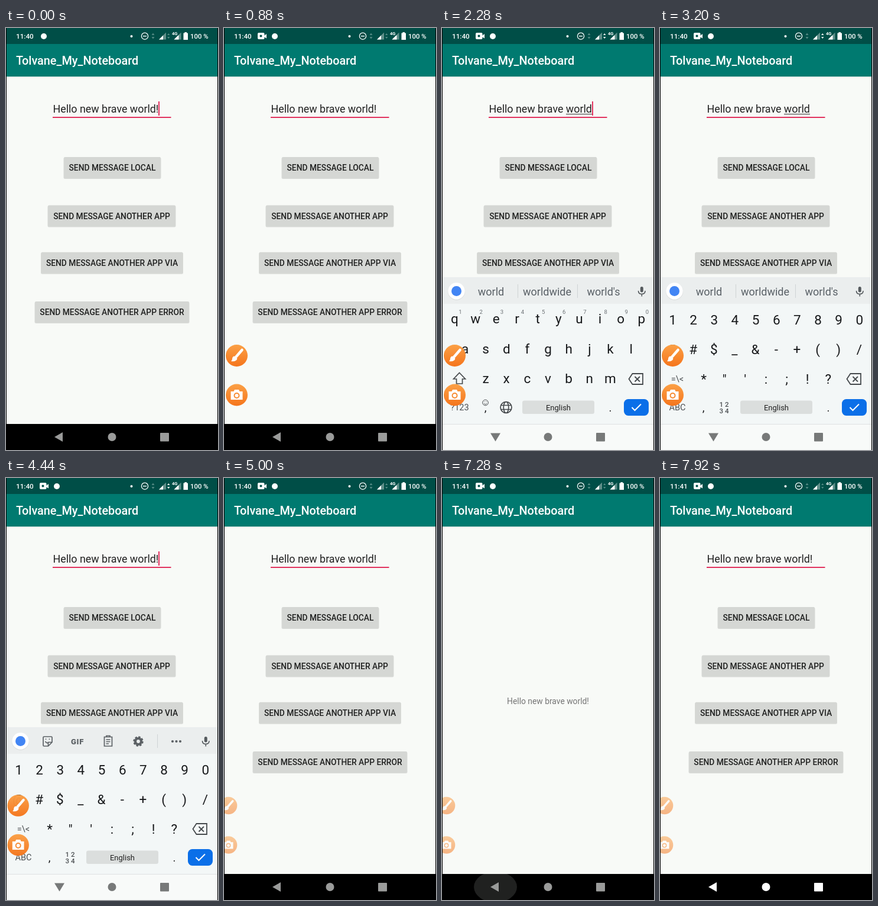
Write an HTML page that moves like this. It is 359x713 px and loops after 8 s.

```html
<!DOCTYPE html>
<html lang="en">
<head>
<meta charset="utf-8">
<title>Messaging demo</title>
<style>
html, body { margin: 0; width: 100%; height: 100%; overflow: hidden; background: #000; }
svg { display: block; width: 100%; height: 100%; font-family: Roboto, sans-serif; }
</style>
</head>
<body>
<svg id="stage" viewBox="0 0 359 713">
  <defs>
    <linearGradient id="orange" x1="0" y1="0" x2="0" y2="1">
      <stop offset="0" stop-color="#fba046"/><stop offset="1" stop-color="#f5751c"/>
    </linearGradient>
    <clipPath id="screen"><rect x="1" y="0" width="357" height="669"/></clipPath>
    <clipPath id="navClip"><rect x="1" y="669" width="357" height="44"/></clipPath>
  </defs>
  <rect width="359" height="713"/>
  <rect x="1" y="82" width="357" height="587" fill="#f8faf7"/>
  <g id="main">
    <text id="entry" x="79.5" y="143" font-size="17.85" fill="#212121"></text>
    <path id="spell" d="M210 145.5H254" stroke="#333"/>
    <rect x="79" y="150" width="200.5" height="2" fill="#e2335f"/>
    <rect id="caret" x="258" y="124" width="2" height="24" fill="#e2335f"/>
    <path id="handle" d="M259 150.5L266 156.5A9.6 9.6 0 1 1 252 156.5Z" fill="#e2335f"/>
    <g id="buttons" font-size="13.82" font-weight="500" text-anchor="middle"></g>
  </g>
  <rect id="dim" x="1" y="82" width="357" height="587" opacity=".042"/>
  <g id="detail">
    <rect x="1" y="82" width="357" height="587" fill="#f8faf7"/>
    <text x="179.5" y="381.5" font-size="13.85" fill="#757575" text-anchor="middle">Hello new brave world!</text>
  </g>
  <rect x="1" y="82" width="357" height="2" fill="#000" opacity=".06"/>
  <rect x="1" y="27" width="357" height="55" fill="#007a70"/>
  <text x="17" y="62" font-size="19.85" font-weight="500" fill="#fff">Tolvane_My_Noteboard</text>
  <g id="status" fill="#fff" font-weight="500">
    <rect x="1" width="357" height="27" fill="#004e47"/>
    <text id="clock" x="17" y="18" font-size="11.7"></text>
    <g id="rec">
      <rect x="57" y="8" width="11.5" height="11" rx="2"/>
      <path d="M68 13L72 10V17.5L68 15Z"/>
      <circle cx="62.5" cy="13.5" r="2" fill="#004e47"/>
    </g>
    <circle id="badge" cy="14" r="5"/>
    <circle cx="212.5" cy="14" r="2"/>
    <circle cx="235" cy="13.7" r="5.6" fill="none" stroke="#fff" stroke-width="1.3"/>
    <path d="M232 13.7H238" stroke="#fff" stroke-width="1.4"/>
    <path d="M246.5 12L249 8.5L251.5 12ZM246.5 15L249 18.5L251.5 15Z" fill="#528a84"/>
    <path id="data" d="M273 12L275.2 9L277.5 12ZM273 15L275.2 18L277.5 15Z"/>
    <path d="M259 19.5L271 7.5V19.5ZM284.500 19.500L296.500 7.500V19.500Z" fill="#618f8a"/>
    <path d="M259 19.5L266 12.5V19.5ZM284.5 19.5L292.5 11.5V19.500Z"/>
    <rect x="280" y="5" width="11.5" height="8" fill="#004e47"/>
    <text x="281" y="12" font-size="7.5" font-weight="700">4G</text>
    <path d="M302.500 8.500V7H306V8.500H308V20H300.500V8.500Z"/>
    <text x="312" y="18" font-size="11.4">100 %</text>
  </g>
  <g clip-path="url(#screen)">
    <g id="keyboard">
      <rect x="1" y="421" width="357" height="248" fill="#f3f7f7"/>
      <rect x="1" y="421" width="357" height="45" fill="#ebeeee"/>
      <circle cx="24.500" cy="445.300" r="14.600" fill="#000" opacity=".07"/>
      <circle cx="24.500" cy="444.500" r="14.200" fill="#fff"/>
      <circle cx="24.500" cy="444.500" r="8.500" fill="#4285f4"/>
      <g id="tools" fill="none" stroke="#5c6165" stroke-width="1.7">
        <path d="M64.500 437H76.500Q78 437 78 438.500V446.500L71.500 453H64.500Q63 453 63 451.500V438.500Q63 437 64.500 437ZM78 446.500H71.500V453M66.500 445Q69 449 72 447M67.500 440.500V442M73.500 440.500V442"/>
        <text x="121" y="449.500" font-size="13" font-weight="900" text-anchor="middle" fill="#5c6165" stroke="none" letter-spacing=".7">GIF</text>
        <path d="M166.500 437.500H179.500V453H166.500ZM170 437.500V435.500H176V437.500M169.500 442H176.500M169.500 445.500H176.500M169.500 449H174"/>
        <circle cx="224" cy="445" r="5" stroke-width="4.200"/>
        <circle cx="224" cy="445" r="7.500" stroke-width="2.400" stroke-dasharray="3.500 2.390"/>
        <path d="M256.500 433V456" stroke="#cfd3d4" stroke-width="1"/>
        <path d="M282 445h.01M288.500 445h.01M295 445h.01" stroke-width="4.200" stroke-linecap="round"/>
      </g>
      <g id="words" font-size="18" fill="#596066" text-anchor="middle">
        <text x="83" y="451.500">world</text>
        <text x="178" y="451.500">worldwide</text>
        <text x="273.500" y="451.500">world's</text>
        <path d="M128.500 433V456M229.500 433V456" stroke="#cfd3d4"/>
      </g>
      <g fill="none" stroke="#555a5e" stroke-width="1.600">
        <rect x="335.800" y="437" width="5" height="9.500" rx="2.500" fill="#555a5e" stroke="none"/>
        <path d="M332.500 444Q332.500 449.500 338.300 449.500T344 444M338.300 449.500V453.500"/>
      </g>
      <g id="letters" text-anchor="middle" fill="#17191b"></g>
      <g id="symbols" text-anchor="middle" fill="#17191b"></g>
      <path d="M322.500 584H340V602H322.500L316.500 593ZM326.500 589L335 597.500M335 589L326.500 597.500" fill="none" stroke="#45494c" stroke-width="1.800"/>
      <rect x="136" y="629.500" width="122" height="22.500" rx="3.500" fill="#dbdedd"/>
      <text x="197" y="646" font-size="13" text-anchor="middle" fill="#222">English</text>
      <text x="285" y="648" font-size="19" text-anchor="middle" fill="#222">.</text>
      <rect x="308" y="627" width="42" height="28" rx="7.500" fill="#0b6fe8"/>
      <path d="M321.500 641L326.500 646L337 635.500" fill="none" stroke="#fff" stroke-width="2"/>
    </g>
    <g id="brush">
      <circle r="18.500" fill="url(#orange)"/>
      <path d="M9 -9.500L-1 2" stroke="#fff" stroke-width="4.500" stroke-linecap="round"/>
      <path d="M-3.500 1L1 5Q-1 11 -9.500 9.500Q-7.500 8 -7.500 5Q-7 1 -3.500 1Z" fill="#fff"/>
    </g>
    <g id="camera">
      <circle r="18.500" fill="url(#orange)"/>
      <path d="M-10 -6H-5L-3.500 -9H3.500L5 -6H10V8H-10Z" fill="#fff"/>
      <circle cy="1" r="4" fill="none" stroke="#f78a30" stroke-width="2"/>
    </g>
  </g>
  <g clip-path="url(#navClip)">
    <rect id="navLight" x="1" y="669" width="357" height="44" fill="#f8faf9"/>
    <path id="navLine" d="M1 669.500H358" stroke="#dfe2e2"/>
    <ellipse id="ripple" cx="90.500" cy="691" rx="36.500" ry="26" fill="#202120"/>
    <rect id="ghost" x="1" y="677" width="357" height="21" fill="#f8f8f3"/>
    <g id="navIcons">
      <path id="back"/>
      <circle cx="179.500" cy="691" r="7"/>
      <rect x="261" y="684" width="15" height="14.500" rx="1"/>
    </g>
  </g>
</svg>
<script>
const $ = id => document.getElementById(id);
const set = (id, attrs) => { for (const k in attrs) $(id).setAttribute(k, attrs[k]); };
const show = (id, on) => set(id, { visibility: on ? "visible" : "hidden" });
const ease = (t, a, b) => {
  const p = Math.min(1, Math.max(0, (t - a) / (b - a)));
  return p * p * (3 - 2 * p);
};
const within = (t, a, b) => t >= a && t < b;
const esc = s => s.replace(/&/g, "&amp;").replace(/</g, "&lt;");
const label = (s, x, y, size, extra = "") =>
  `<text x="${x}" y="${y}" font-size="${size}" ${extra}>${esc(s)}</text>`;
const row = (chars, x, y, size) =>
  [...chars].map((c, i) => label(c, x + i * 35.15, y, size)).join("");

const buttons = [
  ["LOCAL", 98, 218, 164], ["ANOTHER APP", 71, 299.5, 216],
  ["ANOTHER APP VIA", 59.5, 378.700, 240], ["ANOTHER APP ERROR", 49, 462, 261]
];
$("buttons").innerHTML = buttons.map(([name, x, y, w], i) =>
  `<rect x="${x - .5}" y="${y + .5}" width="${w + 1}" height="36.500" rx="2.500" opacity=".13"/>
   <rect id="btn${i}" x="${x}" y="${y}" width="${w}" height="35.500" rx="2" fill="#d5d7d4"/>` +
  label("SEND MESSAGE " + name, x + w / 2, y + 23.2, 13.82, 'fill="#202120"')).join("");

const grey = 'fill="#4b4f52"';
$("letters").innerHTML =
  row("qwertyuiop", 21.5, 499, 22.5) +
  [..."1234567890"].map((c, i) => label(c, 31 + i * 35.15, 482.5, 9.5, 'fill="#6b7074"')).join("") +
  row("asdfghjkl", 39, 549.5, 22.5) + row("zxcvbnm", 74, 599.5, 22.5) +
  label("?123", 30, 646, 14.5, grey) + label(",", 73.5, 648, 19) +
  `<g fill="none" stroke="#45494c" stroke-width="1.700">
    <path d="M29.500 582.500L39.500 593H34.500V601H24.500V593H19.500Z"/>
    <circle cx="73.500" cy="633" r="4.800" stroke-width="1"/>
    <path d="M71 634.500Q73.500 637.500 76 634.500M72 631v1M75 631v1" stroke-width="1"/>
    <circle cx="108.500" cy="641" r="9.500"/><ellipse cx="108.500" cy="641" rx="4.300" ry="9.500"/>
    <path d="M100 637.500H117M100 644.500H117"/></g>`;
$("symbols").innerHTML =
  row("1234567890", 21.5, 501, 22.5) + row("@#$_&-+()/", 21, 550.5, 22.5) +
  row("*\"':;!?", 74, 600.5, 22.5) + label("=\\<", 29.5, 597.5, 14.5, grey) +
  label("ABC", 29.5, 646, 14.5, grey) + label(",", 73.5, 648, 19) +
  label("1 2", 108.5, 639.5, 11.5, grey + ' font-weight="500"') +
  label("3 4", 108.5, 651, 11.5, grey + ' font-weight="500"');

const caretOn = [[0, 400], [1680, 1920], [2240, 2760], [3280, 3760], [4240, 4720], [5160, 5640]];

function draw(t) {
  const edited = within(t, 2200, 3800), pressed = within(t, 5640, 6040);
  const recording = t >= 320;
  $("clock").textContent = t < 5160 ? "11:40" : "11:41";
  show("rec", recording);
  set("badge", { cx: recording ? 86 : 64 });
  set("data", { fill: within(t, 1440, 4880) ? "#fff" : "#528a84" });

  $("entry").textContent = "Hello new brave world" + (edited ? "" : "!");
  show("spell", edited);
  show("caret", caretOn.some(([a, b]) => within(t, a, b)));
  set("caret", { x: edited ? 254 : 258 });
  show("handle", within(t, 1480, 2200));
  set("btn0", { fill: pressed ? "#c5c7c5" : "#d5d7d4" });

  show("dim", within(t, 5800, 6040));
  const opening = t < 6040 ? 0 : t < 6240 ? .9 : 1;
  set("detail", { opacity: t < 7520 ? opening : t < 7720 ? .12 : 0 });

  const up = ease(t, 1400, 1600) * (1 - ease(t, 4700, 5000));
  set("keyboard", { transform: `translate(0 ${(1 - up) * 249})` });
  show("keyboard", up > 0);
  const sym = t >= 3200;
  set("letters", { display: sym ? "none" : "inline" });
  set("symbols", { display: sym ? "inline" : "none" });
  set("tools", { display: edited ? "none" : "inline" });
  set("words", { display: edited ? "inline" : "none" });

  const enter = ease(t, 120, 640), dock = ease(t, 4420, 4560);
  const x = -22 + 43.5 * enter - 14 * dock, scale = 1 - .2 * dock;
  const opacity = enter * (1 - .48 * dock);
  set("brush", { transform: `translate(${x} 553.500) scale(${scale})`, opacity });
  set("camera", { transform: `translate(${x} 620) scale(${scale})`, opacity });

  const ghost = within(t, 5800, 6040), light = up > .4;
  set("navLight", { opacity: up });
  set("navLine", { opacity: up });
  show("ghost", ghost);
  set("ripple", { opacity: within(t, 7240, 7720) ? 1 - .5 * ease(t, 7400, 7720) : 0 });
  set("back", { d: light ? "M82 684.500H99L90.500 698.500Z" : "M82 691L96 683V699Z" });
  set("navIcons", { fill: ghost ? "#fffffd" : light ? "#777979" : t >= 7720 ? "#fff" : "#9a9b9a" });
}

function tick() {
  draw(performance.now() % 8000);
  requestAnimationFrame(tick);
}
tick();
</script>
</body>
</html>
```
